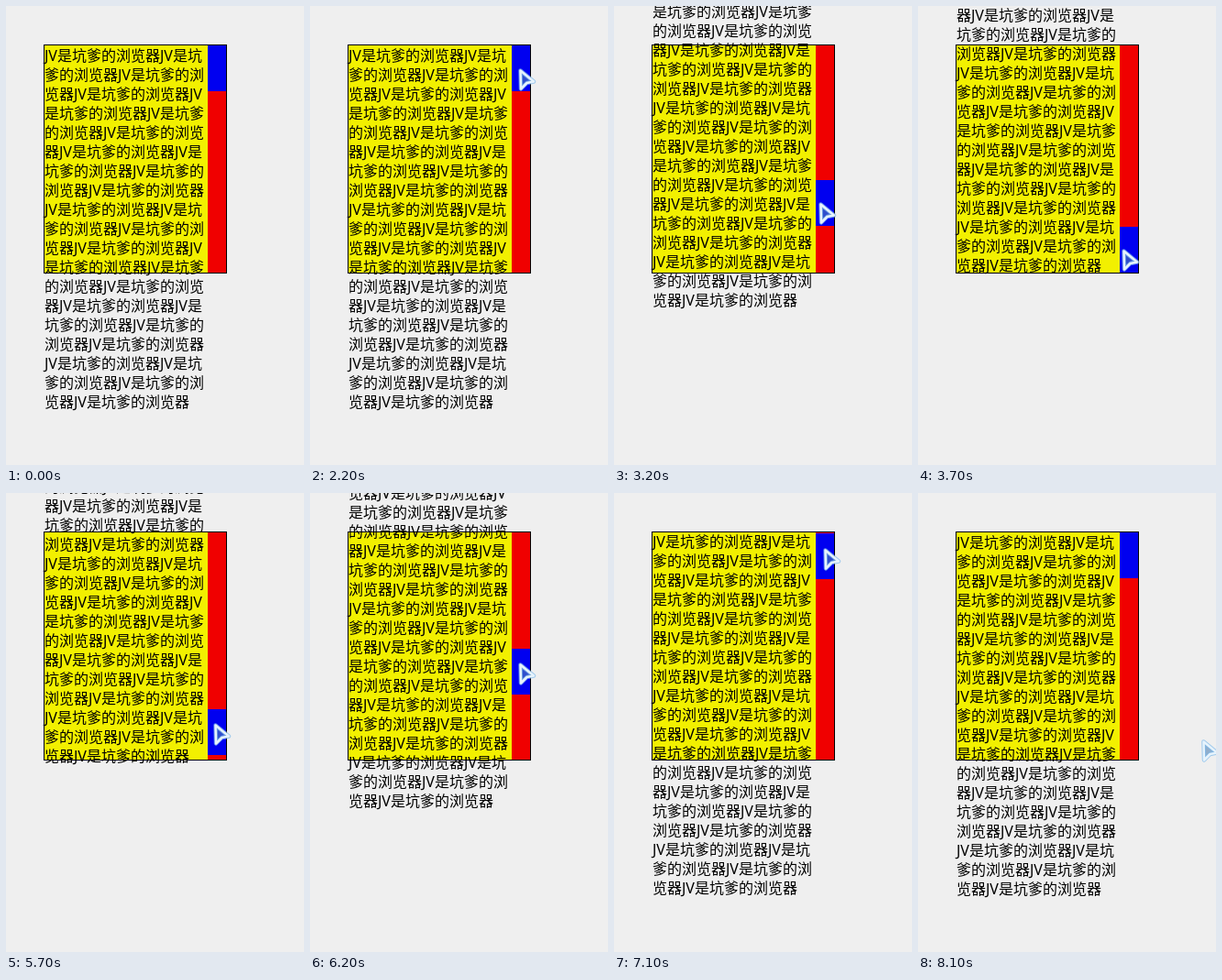
An HTML page with a canvas that plays this animation: 325 by 501 pixels, repeating every 8200 ms.

```html
<!DOCTYPE html>
<html lang="zh-CN">
<head>
<meta charset="utf-8">
<title>自定义滚动条</title>
<style>
html, body { margin: 0; width: 100%; height: 100%; overflow: hidden; background: #efefef; }
canvas { display: block; }
</style>
</head>
<body>
<canvas id="stage" width="325" height="501"></canvas>
<script>
const ctx = document.getElementById('stage').getContext('2d');
const LOOP = 8200, STEP = 100;
const BOX = { x: 41, y: 42, w: 200, h: 250 };
const BAR = 20, THUMB = 50, TRAVEL = 198, LINE = 21, TEXT_W = 178;
const FONT = '350 16px "Noto Sans", "Noto Sans CJK SC", "Noto Sans CJK", sans-serif';

const DOWN = { from: 2200, to: 3700 };
const UP = { from: 5550, to: 7150 };
const ENTER = 100;

// Where the pointer goes during each span of time
const moves = [
  { from: 500, to: 1400, x: 229, y: 70 },
  { ...DOWN, x: 224, y: 267 },
  { from: 3700, to: 4000, x: 217, y: 277 },
  { from: 5000, to: 5400, x: 228, y: 258 },
  { ...UP, x: 230, y: 61 },
  { from: 7500, to: 7600, x: 239, y: 83 },
  { from: 7900, to: 8100, x: 311, y: 271 }
];

function ease({ from, to }, t) {
  const k = Math.min(1, Math.max(0, (t - from) / (to - from)));
  return k * k * (3 - 2 * k);
}

function pointerAt(t) {
  let x = 274, y = 216;
  for (const move of moves) {
    const k = ease(move, t);
    x += (move.x - x) * k;
    y += (move.y - y) * k;
  }
  return [Math.round(x), Math.round(y)];
}

// Wrap between ideographs, keeping the Latin word whole
function wrapText() {
  const units = ['JV', ...'是坑爹的浏览器'];
  const rows = [];
  let row = '';
  ctx.font = FONT;
  for (let i = 0; i < 26 * units.length; i++) {
    const unit = units[i % units.length];
    if (ctx.measureText(row + unit).width > TEXT_W) {
      rows.push(row);
      row = '';
    }
    row += unit;
  }
  rows.push(row);
  return rows;
}

function rect(color, x, y, w, h) {
  ctx.fillStyle = color;
  ctx.fillRect(x, y, w, h);
}

function outline(color, width) {
  ctx.strokeStyle = color;
  ctx.lineWidth = width;
  ctx.stroke();
}

function drawPointer(x, y) {
  ctx.save();
  ctx.translate(x, y);
  ctx.beginPath();
  ctx.moveTo(0.5, 0.5);
  ctx.lineTo(15, 12.5);
  ctx.lineTo(7.5, 14);
  ctx.lineTo(1, 20.5);
  ctx.closePath();
  ctx.lineJoin = 'round';
  ctx.fillStyle = 'rgba(80, 130, 180, 0.6)';
  ctx.fill();
  outline('rgba(125, 185, 235, 0.7)', 4.5);
  outline('#e6f3fc', 2.5);
  ctx.restore();
}

function draw(t) {
  const thumb = Math.round(TRAVEL * (ease(DOWN, t) - ease(UP, t)));
  const scroll = Math.round(thumb * (rows.length * LINE - BOX.h) / TRAVEL);
  const barX = BOX.x + BOX.w - 1 - BAR;

  rect('#efefef', 0, 0, 325, 501);
  rect('#000', BOX.x, BOX.y, BOX.w, BOX.h);
  rect('#f2f000', BOX.x + 1, BOX.y + 1, TEXT_W, BOX.h - 2);
  rect('#f00000', barX, BOX.y + 1, BAR, BOX.h - 2);
  rect('#0000f0', barX, BOX.y + 1 + thumb, BAR, THUMB);

  ctx.font = FONT;
  ctx.fillStyle = '#000';
  rows.forEach((row, i) => ctx.fillText(row, BOX.x + 1, 60 + i * LINE - scroll));

  if (t >= ENTER) drawPointer(...pointerAt(t));
}

const rows = wrapText();
const start = performance.now();

function tick() {
  const t = (performance.now() - start) % LOOP;
  draw(Math.floor(t / STEP) * STEP);
  requestAnimationFrame(tick);
}
tick();
</script>
</body>
</html>
```
